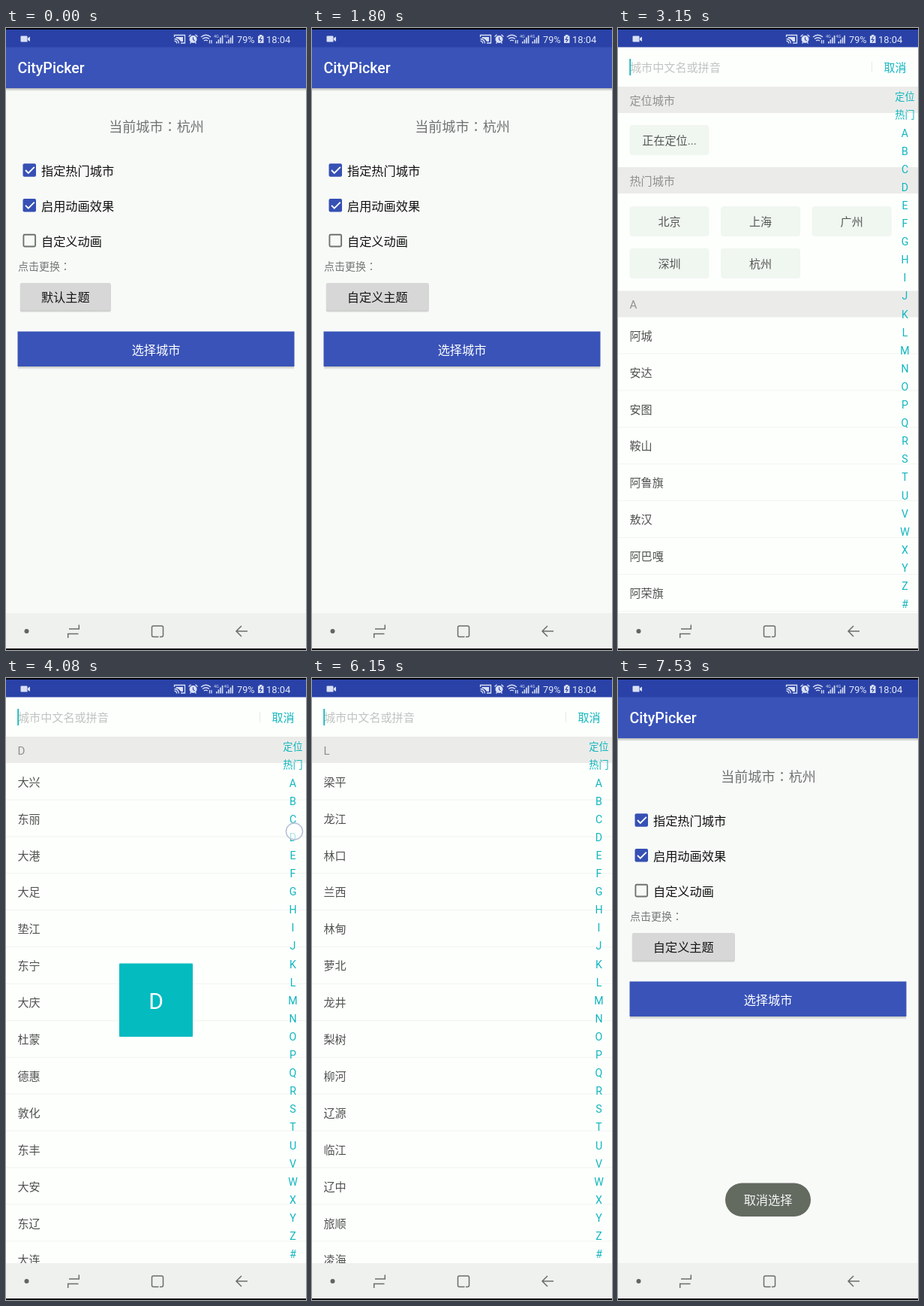
An HTML page for the animation above (7.56 s loop, 400x827 px).

```html
<!DOCTYPE html>
<html lang="zh-CN">
<head>
<meta charset="utf-8">
<title>CityPicker</title>
<style>
html, body { margin: 0; width: 100%; height: 100%; overflow: hidden; background: #000; }
svg { display: block; width: 400px; height: 827px; }
text { font-family: Roboto, "Noto Sans CJK SC", "Noto Sans CJK", sans-serif; white-space: pre; }
.tc { font-family: "Noto Sans CJK TC", "Noto Sans CJK", sans-serif; }
</style>
</head>
<body>
<svg id="stage" viewBox="0 0 400 827">
  <defs>
    <clipPath id="screen"><rect y="2" width="400" height="823"/></clipPath>
    <linearGradient id="fade" x2="0" y2="1">
      <stop stop-color="#000" stop-opacity=".28"/><stop offset="1" stop-color="#000" stop-opacity="0"/>
    </linearGradient>
  </defs>
  <rect width="400" height="827"/>
  <g clip-path="url(#screen)">
    <g id="main"></g>
    <rect y="778" width="400" height="47" fill="#eff1ef"/>
    <g id="panel">
      <rect y="25" width="400" height="802" fill="#fdfffd"/>
      <g id="list"></g>
      <g id="search"></g>
      <g id="index"></g>
      <g id="bubble">
        <rect x="151" y="379.5" width="98" height="97.5" rx="1" fill="#04bbc0"/>
      </g>
    </g>
    <rect id="navBack" y="778" width="400" height="47" fill="#eff1ef"/>
    <g id="nav" fill="none" stroke="#6c6e6c" stroke-width="1.5">
      <circle cx="27.5" cy="802" r="3" fill="#636563" stroke="none"/>
      <path d="M97.3 793.5V799H84M82.7 811V805.5H96.5"/>
      <path d="M203.5 809.5H196.500Q194.500 809.500 194.500 807.500V797Q194.500 795 196.500 795H207.500Q209.500 795 209.500 797V807.500Q209.500 809.500 207.500 809.500H205"/>
      <path d="M322 802H307.500M314 795L307 802L314 809"/>
    </g>
    <g id="status">
      <rect y="2" width="400" height="23.500" fill="#2a42a7"/>
      <g fill="#d9e0f4">
        <path d="M20.500 10.500H27.500Q28.500 10.500 28.500 11.500V18.500H20.500Q19.500 18.500 19.500 17.500V11.500Q19.500 10.500 20.500 10.500ZM29 13.500L32 11.500V18L29 16Z"/>
        <circle cx="249.500" cy="15" r="5"/>
        <path d="M226.500 12H236V18H233Q231 14 226.500 13.500Z"/>
        <path d="M336 10.500H338V9H341.500V10.500H343.500V20H336Z"/>
      </g>
      <g fill="none" stroke="#d9e0f4" stroke-width="1.300">
        <path d="M224.500 12V9.500H238.500V20H233M224.500 14.500Q230 15 230.500 20.500M224.500 17.200Q227.500 17.500 227.800 20.500"/>
        <path d="M243.500 11.500L246.500 8.700M255.500 11.500L252.500 8.700M245.500 20.500L246.800 19M253.500 20.500L252.200 19"/>
        <path d="M260 12Q266.500 6.500 273 12M262 14.500Q266.500 11 271 14.500M264 17Q266.500 15.300 269 17M271.500 16V20.500M274 16V20.500"/>
        <path d="M249.500 12.300V15.300L251.500 17M340.500 11.500L338.300 15.500H341L339 18.800" stroke="#2a42a7" stroke-width="1.100"/>
      </g>
    </g>
    <g id="toast">
      <rect x="143" y="671.500" width="114" height="44.500" rx="22.250" fill="#636a60"/>
    </g>
    <circle id="finger" r="11" fill="#fff" fill-opacity=".65" stroke="#b9c2d8" stroke-width="1.600"/>
  </g>
</svg>
<script>
const LOOP = 7560, TEAL = '#10b6bd', BLUE = '#3953b8';
const $ = id => document.getElementById(id);

function add(parent, tag, attrs) {
  const el = document.createElementNS('http://www.w3.org/2000/svg', tag);
  for (const k in attrs) el.setAttribute(k, attrs[k]);
  return parent.appendChild(el);
}
const group = parent => add(parent, 'g', {});
const rect = (p, x, y, width, height, fill, rx = 0) => add(p, 'rect', { x, y, width, height, fill, rx });
const show = (el, on) => el.setAttribute('visibility', on ? 'visible' : 'hidden');

// cy is the visual middle of the line
function label(p, x, cy, str, size, fill, anchor = 'start', weight = 400) {
  const latin = /^[\x00-\x7f]+$/.test(str);
  const el = add(p, 'text', {
    x, y: cy + size * (latin ? 0.355 : 0.38), 'font-size': size, fill,
    'text-anchor': anchor, 'font-weight': weight
  });
  str.split(/(:)/).forEach(part => {
    const span = add(el, 'tspan', part === ':' && !latin ? { class: 'tc', lang: 'zh-TW' } : {});
    span.textContent = part === ':' && !latin ? '：' : part;
  });
  return el;
}

// Home screen
const main = $('main');
rect(main, 0, 2, 400, 823, '#f8faf8');
rect(main, 0, 80, 400, 4, 'url(#fade)');
rect(main, 0, 25, 400, 55, BLUE);
label(main, 15.5, 53.5, 'CityPicker', 19.6, '#fff', 'start', 500);
label(main, 200.5, 131, '当前城市:杭州', 18.1, '#707371', 'middle');

['指定热门城市', '启用动画效果', '自定义动画'].forEach((name, i) => {
  const y = 189 + i * 46.8;
  if (i < 2) {
    rect(main, 22.5, y - 8.7, 17.5, 17.5, '#3650b4', 2);
    add(main, 'path', { d: `M26 ${y}l3.800 3.900l8-8`, fill: 'none', stroke: '#fff', 'stroke-width': 1.9 });
  } else {
    add(main, 'rect', { x: 23.4, y: y - 7.8, width: 15.7, height: 15.7, rx: 1.5, fill: 'none', stroke: '#707270', 'stroke-width': 1.9 });
  }
  label(main, 47, y + 0.8, name, 16.2, '#101110');
});
label(main, 16, 316.5, '点击更换:', 14, '#757876');

function themeButton(name, width) {
  const g = group(main);
  rect(g, 18.5, 340, width + 1, 38, '#e3e5e3', 2);
  rect(g, 19, 339.5, width, 37, '#c4c6c4', 2);
  rect(g, 19, 339, width, 36.5, '#d6d7d6', 2);
  const press = rect(g, 19, 339, width, 36.5, '#000', 2);
  label(g, 19 + width / 2, 357.5, name, 16.2, '#151615', 'middle');
  return { g, press };
}
const oldTheme = themeButton('默认主题', 120.5);
const newTheme = themeButton('自定义主题', 136.5);
show(newTheme.press, false);

rect(main, 16, 449, 368, 5, 'url(#fade)');
rect(main, 15.5, 403.5, 369, 46.5, BLUE);
const pickPress = rect(main, 15.5, 403.5, 369, 46.5, '#fff');
label(main, 200, 427.5, '选择城市', 16.2, '#fff', 'middle');

// City list
const cities = {
  A: '阿城 安达 安图 鞍山 阿鲁旗 敖汉 阿巴嘎 阿荣旗 阿尔山 安新 安国 安平 安泽 安阳',
  B: '北京 宝山 北辰 宝坻 北碚 璧山 巴南 宾县 巴彦 拜泉 勃利 宝清 北安 白城',
  C: '朝阳 昌平 崇明 重庆 长寿 城口 长春 长岭 长白 昌图 长海 赤峰 承德 沧州',
  D: '大兴 东丽 大港 大足 垫江 东宁 大庆 杜蒙 德惠 敦化 东丰 大安 东辽 大连',
  E: '额尔古纳 鄂伦春旗 鄂尔多斯 鄂托克 额济纳 鄂温克旗 恩施 鄂州 恩平 峨眉山 洱源 峨山 额敏 峨边',
  F: '房山 丰台 奉贤 涪陵 丰都 奉节 方正 富锦 富裕 抚远 扶余 抚松 抚顺 阜新',
  G: '甘南 公主岭 盖州 根河 固阳 高邑 藁城 馆陶 广平 固安 高碑店 广宗 高阳 故城',
  H: '海淀 怀柔 汉沽 合川 哈尔滨 呼兰 海林 桦川 桦南 海伦 黑河 呼玛 呼中 虎林',
  J: '嘉定 金山 津南 静海 蓟州 江津 鸡西 鸡东 佳木斯 嘉荫 加格达奇 九台 蛟河 吉林',
  K: '开县 克东 克山 康平 宽甸 喀左 开原 开鲁 库伦 喀喇沁 康保 宽城 岢岚 开封',
  L: '梁平 龙江 林口 兰西 林甸 萝北 龙井 梨树 柳河 辽源 临江 辽中 旅顺 凌海'
};

function header(g, y, name) {
  rect(g, 0, y, 400, 35, '#ebecea');
  label(g, 15.5, y + 18.5, name, 15.1, '#8f918f');
}
function rows(g, top, names) {
  names.forEach((name, i) => {
    const y = top + i * 48.9;
    label(g, 15.5, y + 24.5, name, 15.1, '#505250');
    rect(g, 0, y + 48, 400, 1, '#f2f4f2');
  });
}
function tag(g, col, y, name) {
  const x = 15.5 + col * 121.6;
  rect(g, x, y, 106, 40, '#f0f6f0', 4);
  label(g, x + 53, y + 20.7, name, 15.1, '#555755', 'middle');
}

const list = $('list'), sections = { hot: group(list) }, hot = sections.hot;
header(hot, 78, '定位城市');
tag(hot, 0, 129, '正在定位...');
header(hot, 185, '热门城市');
['北京', '上海', '广州', '深圳', '杭州'].forEach((name, i) => tag(hot, i % 3, 237 + 56 * Math.floor(i / 3), name));
header(hot, 349.5, 'A');
rows(hot, 384.5, cities.A.split(' ').slice(0, 9));
for (const key in cities) {
  const g = sections[key] = group(list);
  header(g, 78, key);
  rows(g, 113.5, cities[key].split(' '));
}

const search = $('search');
label(search, 16, 52.5, '城市中文名或拼音', 15.1, '#c0c4c1');
label(search, 354.5, 52.5, '取消', 15, TEAL);
rect(search, 338, 45, 1, 14, '#e7eae7');
const caret = rect(search, 15.3, 41, 1.8, 22, TEAL);

const STEP = 24.1, marks = ['定位', '热门', ...'ABCDEFGHIJKLMNOPQRSTUVWXYZ#'];
marks.forEach((m, i) => label($('index'), 382.5, 91.3 + i * STEP, m, i < 2 ? 13.2 : 14.2, TEAL, 'middle'));

const bubbleText = label($('bubble'), 200, 429, 'I', 30, '#fff', 'middle');
label($('toast'), 200, 694.3, '取消选择', 16.2, '#f4f6f4', 'middle');
const status = $('status');
label(status, 308, 15, '79%', 12.7, '#e4e9f7');
label(status, 347, 15, '18:04', 13, '#e4e9f7');
[278, 291.5].forEach(x => {
  label(status, x - 1, 11.5, '4G', 5.5, '#d9e0f4');
  for (let i = 0; i < 4; i++) rect(status, x + 2 + i * 2.6, 18 - i * 2.7, 1.6, 2.5 + i * 2.7, '#d9e0f4');
});

// Motion
const clamp = v => Math.max(0, Math.min(1, v));
const ramp = (t, from, to) => clamp((t - from) / (to - from));
const smooth = v => (1 - Math.cos(Math.PI * v)) / 2;
const touch = (t, from, to) => Math.min(ramp(t, from - 60, from), 1 - ramp(t, to, to + 90));
const IN = 2700, OUT = 7000, SLIDE = 300;
const drag = { from: 3650, to: 5560 };
const taps = [[1110, 1270, 82, 358], [2260, 2420, 200, 428], [6740, 6900, 370, 53]];
const dragY = t => Math.min(408, 140 + Math.max(0, t - drag.from) * 0.1485);

function render(t) {
  const changed = t >= 1290;
  show(oldTheme.g, !changed);
  show(newTheme.g, changed);
  show(oldTheme.press, !changed);
  oldTheme.press.setAttribute('opacity', 0.1 * touch(t, 1130, 1270));
  pickPress.setAttribute('opacity', 0.14 * touch(t, 2290, 2450));

  const offset = 802 * (1 - smooth(ramp(t, IN, IN + SLIDE)) + smooth(ramp(t, OUT, OUT + SLIDE)));
  $('panel').setAttribute('transform', `translate(0 ${offset.toFixed(2)})`);
  show($('navBack'), offset < 0.5 || offset > 801);
  caret.setAttribute('opacity', (t - IN + LOOP) % LOOP % 1000 < 500 ? 1 : 0);

  const dragging = t >= drag.from && t < drag.to;
  const y = dragY(t);
  const mark = marks[Math.floor((y - 79.3) / STEP)];
  const open = t < drag.from ? 'hot' : sections[mark] ? mark : 'H';
  for (const key in sections) sections[key].setAttribute('display', key === open ? 'inline' : 'none');
  $('bubble').setAttribute('display', dragging ? 'inline' : 'none');
  bubbleText.firstChild.textContent = mark;

  let alpha = touch(t, drag.from, drag.to), fx = 384.5, fy = y;
  for (const [from, to, x, ty] of taps) {
    const a = touch(t, from, to);
    if (a > 0) [alpha, fx, fy] = [a, x, ty];
  }
  const finger = $('finger');
  finger.setAttribute('cx', fx);
  finger.setAttribute('cy', fy);
  finger.setAttribute('opacity', alpha);
  $('toast').setAttribute('opacity', ramp(t, 7180, 7380));
}

const start = performance.now();
function tick() {
  render((performance.now() - start) % LOOP);
  requestAnimationFrame(tick);
}
tick();
</script>
</body>
</html>
```
